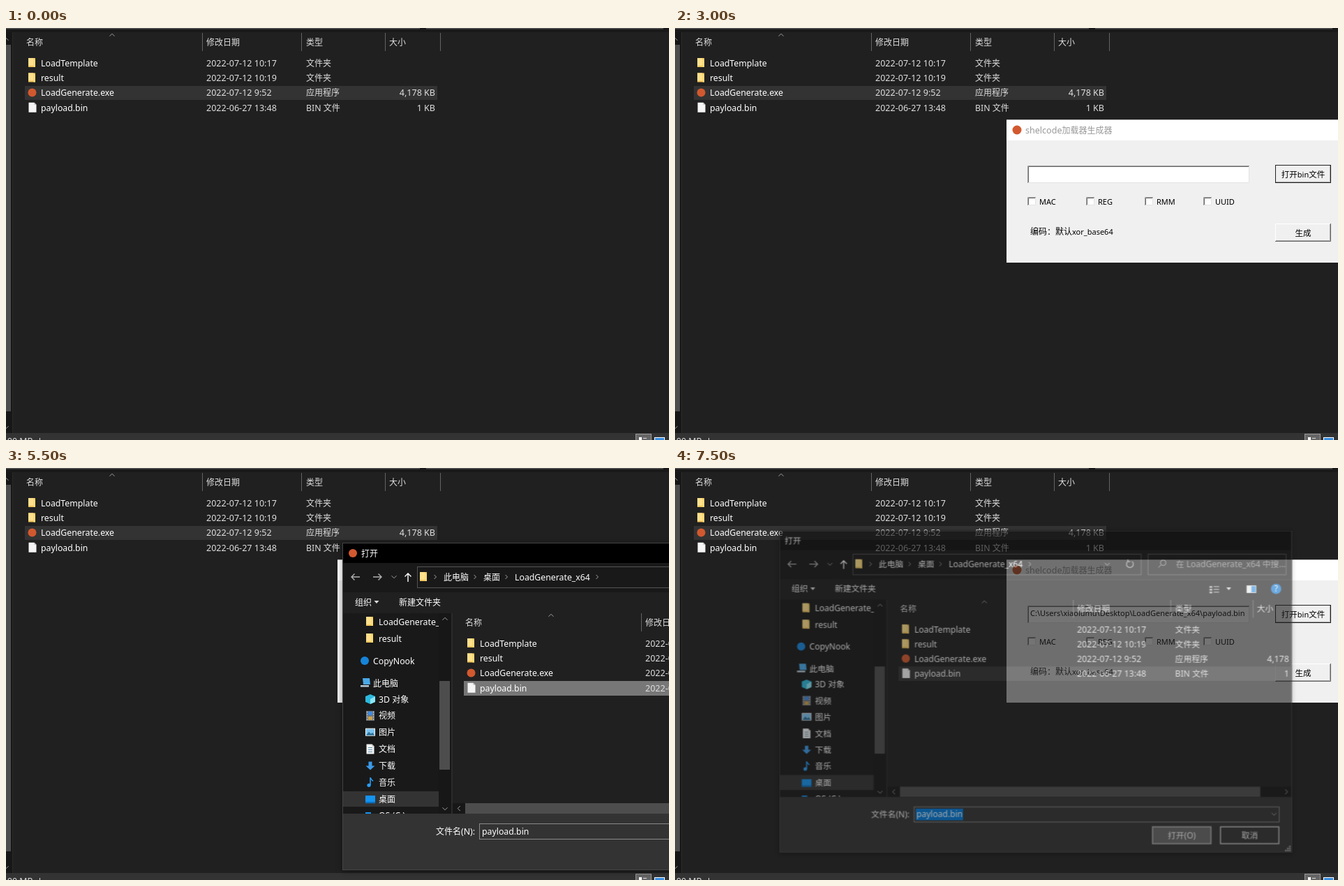
An HTML page that plays this animation: 950x590 px, repeating every 8 s.

```html
<!DOCTYPE html>
<html lang="zh">
<head>
<meta charset="utf-8">
<title>File picker</title>
<style>
html, body { margin: 0; width: 100%; height: 100%; overflow: hidden; background: #202020; }
svg { display: block; width: 950px; height: 590px; }
text { font: 12.3px 'Noto Sans', 'Open Sans', 'Noto Sans CJK SC', sans-serif; white-space: pre; }
.num { font-size: 12.55px; }
#win text { font-size: 11px; }
#win #winTitle { font-size: 12.55px; }
#win .cjk, .cjk { font: 12px 'Noto Sans CJK SC', 'Noto Sans CJK', sans-serif; }
#win .label .cjk { font-size: 11.5px; }
#shadow { filter: blur(4px); }

#row, #win, #winTitle, #winCaret, #focus, #path, #dlg, #bar, #dlgTitle, .active, #head,
#caret, #sel, #name, #field, #mark, #thumb, #ok { animation: 8s step-end infinite; }

/* 500 ms = 6.25% */
#row { animation-name: row; }
@keyframes row { 0% { fill: #333 } 6.25% { fill: #777 } 25% { fill: #333 } }
#win { --w: #fff; transform-origin: 710px 234px; animation-name: win; }
@keyframes win {
  0% { opacity: 0 }
  18.75% { opacity: .933; transform: scale(.995); --w: #f0f0f0 }
  25% { opacity: 1; transform: none; --w: #fff }
}
.paper { fill: var(--w); }
#winTitle { animation-name: winTitle; }
@keyframes winTitle { 0% { fill: #000 } 37.5% { fill: #999 } }
#winCaret { animation-name: winCaret; }
@keyframes winCaret { 0% { opacity: 1 } 31.25% { opacity: 0 } }
#focus { animation-name: focus; }
@keyframes focus { 0% { opacity: 0 } 37.5% { opacity: 1 } }
#path { animation-name: path; }
@keyframes path { 0% { opacity: 0 } 93.75% { opacity: 1 } }

#dlg { transform-origin: 516.5px 294px; animation-name: dlg; }
@keyframes dlg {
  0% { opacity: 0 }
  43.75% { opacity: 1; transform: translate(339px, 21px) }
  81.25% { opacity: 1; transform: none }
  93.75% { opacity: .62; transform: scale(.9835) }
}
#bar { animation-name: bar; }
@keyframes bar { 0% { fill: #000 } 93.75% { fill: #101010 } }
#dlgTitle { animation-name: dlgTitle; }
@keyframes dlgTitle { 0% { transform: none } 93.75% { transform: translateX(-19px) } }
.active { animation-name: active; }
@keyframes active { 0% { opacity: 1 } 93.75% { opacity: 0 } }
#head, #caret { animation-name: early; }
@keyframes early { 0% { opacity: 1 } 50% { opacity: 0 } }
#sel { animation-name: sel; }
@keyframes sel { 0% { opacity: 0; fill: #777 } 56.25% { opacity: 1; fill: #777 } 93.75% { opacity: 1; fill: #333 } }
#name { animation-name: name; }
@keyframes name { 0% { opacity: 0 } 56.25% { opacity: 1 } }
#field { animation-name: field; }
@keyframes field {
  0% { stroke: #fff } 56.25% { stroke: #ccc } 62.5% { stroke: #8a8a8a }
  87.5% { stroke: #fff } 93.75% { stroke: #8a8a8a }
}
#mark { animation-name: mark; }
@keyframes mark { 0% { opacity: 0 } 87.5% { opacity: 1 } }
#thumb { animation-name: thumb; }
@keyframes thumb { 0% { fill: #4d4d4d } 62.5% { fill: #7a7a7a } 68.75% { fill: #4d4d4d } }
#ok { animation-name: ok; }
@keyframes ok { 0% { fill: #333; stroke: #fff } 93.75% { fill: #666; stroke: #b0b0b0 } }
</style>
</head>
<body>
<svg id="stage" viewBox="0 0 950 590"></svg>
<script>
const rect = (x, y, w, h, fill, more = '') =>
  `<rect x="${x}" y="${y}" width="${w}" height="${h}" fill="${fill}" ${more}/>`;
const box = (x, y, w, h, fill, line, more = '') =>
  rect(x + .5, y + .5, w - 1, h - 1, fill, `stroke="${line}" ${more}`);
const line = (d, color, more = '') => `<path d="${d}" fill="none" stroke="${color}" ${more}/>`;
const shape = (d, fill) => `<path d="${d}" fill="${fill}"/>`;
const dot = (x, y, r, fill, more = '') => `<circle cx="${x}" cy="${y}" r="${r}" fill="${fill}" ${more}/>`;
const clip = (id, x, y, w, h) => `<clipPath id="${id}">${rect(x, y, w, h, '#000')}</clipPath>`;

// y is the middle of the line
const text = (x, y, s, fill = '#fff', more = '') =>
  `<text x="${x}" y="${y + 4.5}" fill="${fill}" ${more}>` +
  s.replace(/[\u3000-\uffef]+/g, '<tspan class="cjk">$&</tspan>') + '</text>';
const mid = 'text-anchor="middle"', end = 'text-anchor="end"', num = 'class="num"';

const turn = { down: 0, up: 180, left: 90, right: -90 };
const chevron = (x, y, dir, color = '#a0a0a0', r = 3.5) =>
  line(`M${-r} ${-r / 2}L0 ${r / 2}L${r} ${-r / 2}`, color,
    `transform="translate(${x} ${y}) rotate(${turn[dir]})"`);
const arrow = (x, y, dir, color) =>
  line('M0 -6V6M-4.5 1.5L0 6L4.5 1.5', color,
    `stroke-width="1.4" transform="translate(${x} ${y}) rotate(${turn[dir]})"`);
const wedge = (x, y) => shape(`M${x - 3.5} ${y - 2}h7l-3.5 4z`, '#ddd');

const folder = (x, y) => rect(x, y - 7, 10, 13, '#f3c65c') + rect(x, y - 7, 7.5, 11, '#ffe08c') +
  rect(x + 7.5, y - 5, 2.5, 11, '#ffdb78');
const page = (x, y) => shape(`M${x} ${y - 7}h8l3 3v11h-11z`, '#f4f4f4') +
  shape(`M${x + 8} ${y - 7}v3h3z`, '#b8b8b8');
const badge = (x, y, r = 6, more = '') => dot(x, y, r, '#d2592f', more);

const files = [
  ['LoadTemplate', '2022-07-12 10:17', '文件夹', ''],
  ['result', '2022-07-12 10:19', '文件夹', ''],
  ['LoadGenerate.exe', '2022-07-12 9:52', '应用程序', '4,178 KB'],
  ['payload.bin', '2022-06-27 13:48', 'BIN 文件', '1 KB']
];
const list = () => {
  const heads = [[29, '名称'], [287, '修改日期'], [430, '类型'], [549, '大小']];
  return heads.map(([x, s]) => text(x, 20, s, '#dedede')).join('') +
    [281, 423, 543, 622].map(x => rect(x, 7, 1, 26, '#636363')).join('') +
    chevron(152, 10, 'up') +
    files.map(([name, date, kind, size], i) => {
      const y = 50 + i * 21.45;
      const icon = i < 2 ? folder(32, y) : i == 2 ? badge(37.5, y - .5) : page(32.5, y - .5);
      return icon + text(50, y, name) + text(287, y, date, '#dedede', num) +
        text(430, y, kind, '#dedede') + text(615, y, size, '#dedede', `${num} ${end}`);
    }).join('');
};

const explorer = () =>
  rect(0, 0, 950, 590, '#202020') + rect(0, 0, 950, 6, '#191919') +
  rect(0, 0, 593, 1.5, '#535353') + rect(602, 0, 340, 1.5, '#535353') +
  rect(0, 6, 9, 574, '#171717') + rect(0, 24, 7, 525, '#4d4d4d') + rect(9, 6, 1, 574, '#2b2b2b') +
  chevron(0, 16, 'up') + chevron(0, 572, 'down') +
  rect(27, 83, 591, 20, '#333', 'id="row"') + list() +
  rect(0, 580, 950, 10, '#333') + text(2, 591, '90 MB', '#dedede') + rect(48, 587, 1, 3, '#ddd') +
  box(902, 581, 23, 12, '#666', '#999') + rect(907, 586, 4, 4, '#fff') + rect(913, 587, 5, 1, '#ddd') +
  box(929, 586, 15, 8, '#3a8ee0', '#fff');

const sunken = (x, y, w, h) => rect(x, y, w, h, '', 'class="paper"') +
  line(`M${x + .5} ${y + h}V${y + .5}H${x + w}`, '#a0a0a0') +
  line(`M${x + 1.5} ${y + h - 1}V${y + 1.5}H${x + w - 1}`, '#696969') +
  line(`M${x + 1} ${y + h - .5}H${x + w - .5}V${y + 1}`, '#e3e3e3');
const button = (x, y, w, h, label) => rect(x, y, w, h, '#f0f0f0') +
  line(`M${x + .5} ${y + h}V${y + .5}H${x + w}`, '#fff') +
  line(`M${x} ${y + h - .5}H${x + w - .5}V${y}`, '#696969') +
  line(`M${x + 1} ${y + h - 1.5}H${x + w - 1.5}V${y + 1}`, '#a0a0a0') +
  text(x + w / 2, y + h / 2, label, '#000', `class="label" ${mid}`);

const generator = () => '<g id="win">' +
  rect(475, 131.5, 500, 204.5, '#f0f0f0') + rect(475, 131.5, 500, 29.5, '', 'class="paper"') +
  badge(490, 146, 6.5) + text(502, 146, 'shelcode加载器生成器', '#000', 'id="winTitle"') +
  sunken(505, 197, 318, 25) + rect(509, 199, 1, 14, '#000', 'id="winCaret"') +
  text(509, 207, String.raw`C:\Users\xiaolumu\Desktop\LoadGenerate_x64\payload.bin`, '#000', 'id="path"') +
  ['MAC', 'REG', 'RMM', 'UUID'].map((s, i) =>
    sunken(505 + i * 84, 242, 12, 12) + text(522 + i * 84, 248, s, '#000')).join('') +
  text(509, 291, '编码：默认xor_base64', '#000') +
  button(860, 196, 80, 26, '打开bin文件') + box(860, 196, 80, 26, 'none', '#222', 'id="focus"') +
  button(860, 280, 80, 26, '生成') + '</g>';

const treeIcons = {
  '3D 对象': y => shape(`M183 ${y - 7}l7 3v8l-7 3l-7-3v-8z`, '#2cb8dc') + shape(`M183 ${y}l7-4v8l-7 3z`, '#8ce6f5'),
  '视频': y => rect(177, y - 7, 12, 14, '#6b7480') + rect(180, y - 6, 6, 5, '#3f8ae0') + rect(180, y + 1, 6, 5, '#c9a24b') +
    line(`M178.5 ${y - 6}v13M187.5 ${y - 6}v13`, '#ddd', 'stroke-dasharray="1.5 2"'),
  '图片': y => box(176, y - 6, 14, 11, '#7cc4f0', '#f4f4f4') + shape(`M177 ${y + 4}l4-5l3 3l2-2l3 4z`, '#2d6f95'),
  '文档': y => page(177.5, y) + line(`M180 ${y - 2}h6M180 ${y + 1}h6M180 ${y + 4}h6`, '#5a8fb0'),
  '下载': y => shape(`M180.5 ${y - 6}h5v6h4l-6.5 6l-6.5-6h4z`, '#3c9ae8'),
  '音乐': y => dot(181, y + 4, 2.6, '#2a9df4') + line(`M183 ${y + 4}v-11q1 3 4 5`, '#2a9df4', 'stroke-width="1.6"'),
  '桌面': y => rect(176, y - 5, 14, 11, '#1493f0') + rect(176, y + 4, 14, 2, '#0b6fbd'),
  'OS (C:)': y => rect(176, y - 5, 8, 8, '#1493f0')
};
const tree = () => '<g clip-path="url(#treeClip)">' +
  rect(144, 442, 137, 22, '#333') +
  folder(177, 199) + text(195, 199, 'LoadGenerate_') + folder(177, 223) + text(195, 223, 'result') +
  dot(175, 255, 6, '#1784d8') + text(187, 255, 'CopyNook') +
  shape('M172 280h10l1 9h-10z', '#4aa8e8') + rect(169, 290, 12, 2.5, '#b8cbd8') + text(187, 287, '此电脑') +
  Object.entries(treeIcons).map(([s, icon], i) => {
    const y = 310 + i * 23.85;
    return icon(y) + text(195, y, s);
  }).join('') + '</g>' +
  rect(281, 187, 18, 287, '#171717') + rect(282, 284, 15, 127, '#4d4d4d') +
  chevron(290, 195, 'up') + chevron(290, 467, 'down');

const navigation = () =>
  rect(143, 115, 747, 42, '#191919') +
  arrow(162, 135, 'left', '#b0b0b0') + arrow(193, 135, 'right', '#b0b0b0') +
  chevron(217, 135, 'down') + arrow(237, 136, 'up', '#fff') +
  box(250, 120, 421, 31, '#191919', '#535353') + folder(254, 135) +
  [276, 333, 378, 508].map(x => chevron(x, 135, 'right', '#a0a0a0', 3)).join('') +
  text(288, 135, '此电脑') + text(345, 135, '桌面') + text(390, 135, 'LoadGenerate_x64') +
  chevron(621, 135, 'down') + line('M657 131A5 5 0 1 1 651 131M651 128v3.5h3.5', '#a0a0a0', 'stroke-width="1.3"') +
  box(680, 120, 202, 31, '#191919', '#535353') +
  dot(702.5, 133, 4, 'none', 'stroke="#999"') + line('M699.5 136l-4 4', '#999') +
  text(721, 135, '在 LoadGenerate_x64 中搜...', '#8a8a8a') +
  rect(143, 157, 747, 30, '#202020') +
  text(161, 171, '组织') + wedge(192, 171) + text(224, 171, '新建文件夹') +
  [167, 171, 175].map(y => rect(770, y, 4, 2.5, '#bbb') + rect(776, y, 8, 1.5, '#999')).join('') +
  wedge(798, 171) + rect(824, 166, 14, 11, '#f0f0f0') + rect(831, 167, 6, 9, '#3a9be8') +
  dot(867, 171, 7.5, '#1c7fd6') + text(867, 171, '?', '#fff', mid);

const footer = () =>
  rect(143, 474, 747, 81, '#333') + text(333, 499, '文件名(N):', '#fff', end) +
  box(339, 488, 533, 23, '#333', '#fff', 'id="field"') + chevron(864, 499, 'down') +
  rect(342, 491, 1, 16, '#fff', 'id="caret"') +
  rect(342, 491, 69, 17, '#0078d7', 'id="mark"') + text(343, 499, 'payload.bin', '#fff', 'id="name"') +
  rect(687, 517.5, 85, 24.5, '#333', 'id="ok" stroke="#fff" stroke-width="1.7"') +
  text(729.5, 529.5, '打开(O)', '#fff', mid) +
  rect(786, 517.5, 85, 24.5, '#333', 'stroke="#c8c8c8" stroke-width="1.5"') + text(828.5, 529.5, '取消', '#fff', mid) +
  [[886, 545], [883, 548], [886, 548], [880, 551], [883, 551], [886, 551]]
    .map(([x, y]) => rect(x, y, 2, 2, '#bbb')).join('');

const picker = () => '<g id="dlg">' + rect(143, 88, 747, 469, 'rgba(0,0,0,.4)', 'id="shadow"') +
  '<g clip-path="url(#dlgClip)">' +
  rect(143, 86, 747, 469, '#202020') + rect(143, 86, 747, 29, '#000', 'id="bar"') +
  badge(158, 101, 6, 'class="active"') + text(170, 101, '打开', '#fff', 'id="dlgTitle"') +
  line('M869 96l10 10M879 96l-10 10', '#fff', 'class="active" stroke-width="1.3"') +
  navigation() + rect(143, 187, 156, 287, '#191919') + tree() + rect(299, 187, 2, 287, '#2b2b2b') +
  '<g id="head">' + rect(302, 187, 269, 26, '#434343') + rect(556, 187, 1, 26, '#5a5a5a') +
  chevron(562.5, 200, 'down') + '</g>' +
  rect(317, 284, 591, 21, '#777', 'id="sel"') +
  `<g transform="translate(290 180)">${list()}</g>` +
  rect(301, 459, 589, 15, '#171717') + rect(319, 459, 525, 15, '#4d4d4d', 'id="thumb"') +
  chevron(310, 466.5, 'left') + chevron(882, 466.5, 'right') +
  footer() + box(143, 86, 747, 469, 'none', '#444') + '</g></g>';

document.getElementById('stage').innerHTML =
  `<defs>${clip('dlgClip', 143, 86, 747, 469)}${clip('treeClip', 144, 187, 138, 287)}</defs>` +
  explorer() + generator() + picker();
</script>
</body>
</html>
```
